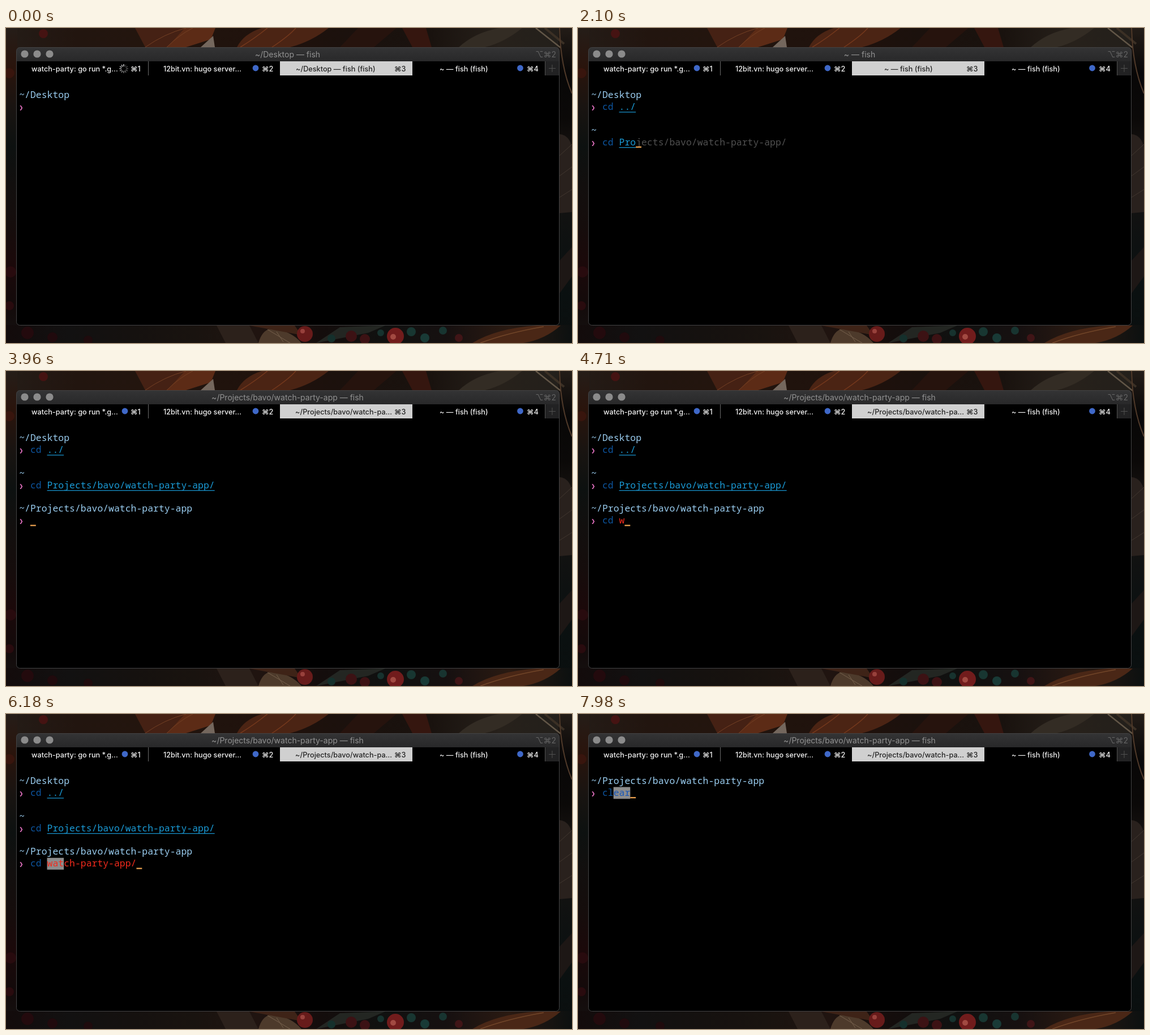
Animation of 1000 by 558 pixels, one loop 8000 ms. Source, as an HTML page with a canvas:

```html
<!DOCTYPE html>
<html lang="en">
<head>
<meta charset="utf-8">
<title>Terminal session</title>
<style>
  html, body { margin: 0; width: 100%; height: 100%; overflow: hidden; background: #14100e; }
  canvas { display: block; width: 100vw; height: 100vh; }
</style>
</head>
<body>
<canvas id="stage" width="1000" height="558"></canvas>
<script>
const ctx = document.getElementById('stage').getContext('2d');
const LOOP = 8000, CELL = 9.87, ROW = 20.9, LEFT = 23.2, BASE = 124;
const MONO = '16.45px "Noto Sans Mono", "DejaVu Sans Mono", monospace';
const SANS = 'Inter, "DejaVu Sans", sans-serif';
const C = { path: '#9acdf0', cmd: '#0d559f', arg: '#1a9bd7', hint: '#505050',
            bad: '#f22a1c', prompt: '#f57ad0', cursor: '#f2a552', hit: '#8c8c8c', dot: '#3f68c8' };
const PROJECT = 'Projects/bavo/watch-party-app';

// ---------- drawing helpers ----------
function rect(x, y, w, h, color) {
  ctx.fillStyle = color;
  ctx.fillRect(x, y, w, h);
}

function disc(x, y, r, color) {
  ctx.fillStyle = color;
  ctx.beginPath();
  ctx.arc(x, y, r, 0, 7);
  ctx.fill();
}

function label(text, x, y, font, color, align = 'left') {
  ctx.font = font + ' ' + SANS;
  ctx.fillStyle = color;
  ctx.textAlign = align;
  ctx.fillText(text, x, y);
}

function gradient(x0, y0, x1, y1, colors) {
  const g = ctx.createLinearGradient(x0, y0, x1, y1);
  colors.forEach((c, i) => g.addColorStop(i / (colors.length - 1), c));
  return g;
}

function shape(d, fill, stroke, width = 1) {
  const p = new Path2D(d);
  if (fill) { ctx.fillStyle = fill; ctx.fill(p); }
  if (stroke) { ctx.strokeStyle = stroke; ctx.lineWidth = width; ctx.stroke(p); }
}

// ---------- autumn backdrop ----------
function backdrop() {
  rect(0, 0, 1000, 558, '#120f0e');
  rect(0, 0, 1000, 36, gradient(0, 0, 1000, 0,
    ['#241c17', '#22150f', '#23150e', '#20130d', '#1f110c', '#1a110d', '#19120e', '#27211b', '#221f1b']));
  rect(0, 0, 20, 558, gradient(0, 0, 0, 558,
    ['#251d18', '#2a140c', '#191411', '#0d1110', '#120f0e', '#150d0c', '#1b090a', '#130a0a', '#151211']));
  rect(976, 0, 24, 558, gradient(0, 0, 0, 558,
    ['#231c17', '#080707', '#0b0908', '#1a1613', '#121211', '#0d1111', '#0a1010', '#0b0f0f']));
  rect(0, 526, 1000, 32, gradient(0, 0, 1000, 0,
    ['#130b0b', '#121111', '#15110f', '#19130f', '#201410', '#140d0c', '#101110', '#161010', '#2a1a12', '#0c1010']));

  disc(66, 10, 8, '#451312');
  shape('M228 0H316L284 34H246Z', '#452114');
  shape('M316 0H370L362 20L318 34H284Z', '#5c2b16');
  shape('M344 34L366 14L369 34Z', '#74675d');
  shape('M246 34Q280 10 318 0M284 34Q306 12 330 0', null, '#744024');
  shape('M408 34Q420 10 452 0H570Q540 24 502 34Z', '#4b2414');
  shape('M470 34Q500 14 512 0M414 34Q440 18 462 0', null, '#74381c', 1.5);
  shape('M590 34L622 0H690L650 34Z', '#26130d');
  shape('M700 0H742L752 34H718Z', '#35160f');
  shape('M800 34Q828 8 872 0H912Q880 26 846 34Z', '#332c24');
  shape('M936 0L980 35', null, '#625647', 2.5);
  shape('M952 0L986 28', null, '#3b3025', 4);
  shape('M978 0Q980 70 1000 116', null, '#503a2a', 2);
  shape('M978 188Q996 190 1000 212V326L978 328Z', '#29211d');
  shape('M978 226L1000 206M978 262L1000 246M978 300L1000 286', null, '#41362f');
  shape('M978 412L1000 388V440L978 470Z', '#1d1715');

  [[6, 80, 9, '#38150d'], [8, 432, 10, '#280b0e'], [6, 492, 8, '#290b0e'],
   [38, 540, 11, '#230a0d'], [82, 548, 9, '#200a0d'], [145, 553, 8, '#1f0b0d'],
   [404, 550, 8, '#281310']].forEach(d => disc(...d));
  shape('M372 527H430L446 558H388Z', '#2c211b');
  shape('M446 558Q452 536 468 532Q504 536 522 558Z', '#4d3a2b');
  shape('M462 534L502 558M478 538L490 556', null, '#75604b');
  shape('M430 527H510L522 544Z', '#3e2317');
  shape('M548 558L590 530L670 527L640 540Z', '#232622');
  [[528, 542, 14, '#671b1a'], [575, 550, 7, '#15302c'], [610, 546, 10, '#3c1214'],
   [634, 551, 9, '#3c1214'], [662, 540, 6, '#17322e'], [688, 546, 15, '#711c1c'],
   [716, 538, 8, '#183631'], [740, 549, 8, '#193a36'], [772, 536, 7, '#183430'],
   [800, 549, 7, '#401517']].forEach(d => disc(...d));
  disc(524, 537, 4, '#98413c');
  disc(684, 547, 5, '#a24a42');
  shape('M824 558Q866 532 938 527H980Q952 552 914 558Z', '#4a2716');
  shape('M838 558Q886 540 950 529', null, '#724629', 1.5);
}

// ---------- terminal window ----------
function spinner(x, y, t) {
  const lead = Math.floor(t / 80) % 12;
  for (let i = 0; i < 12; i++) {
    const a = i * Math.PI / 6 - Math.PI / 2;
    const fade = ((lead - i + 12) % 12) / 12;
    ctx.strokeStyle = `rgba(205,205,205,${0.9 - 0.7 * fade})`;
    ctx.lineWidth = 1.7;
    ctx.beginPath();
    ctx.moveTo(x + 4 * Math.cos(a), y + 4 * Math.sin(a));
    ctx.lineTo(x + 8 * Math.cos(a), y + 8 * Math.sin(a));
    ctx.stroke();
  }
}

function tab(x, text, textX, number, active) {
  const color = active ? '#242424' : '#f2f2f2';
  const font = '500 12.7px';
  if (active) rect(x, 59, 234, 25, '#d0d0d0');
  label(text, textX, 77, font, color);
  label('⌘' + number, x + 202, 77, font, color);
}

function chrome(t) {
  ctx.beginPath();
  ctx.roundRect(18.5, 34.5, 959, 492, 6);
  ctx.fillStyle = '#000';
  ctx.fill();
  ctx.save();
  ctx.clip();
  rect(18, 34, 960, 25, gradient(0, 34, 0, 59, ['#343435', '#282829']));
  ctx.restore();
  ctx.strokeStyle = '#434344';
  ctx.lineWidth = 1;
  ctx.stroke();
  [33, 55, 77].forEach(x => disc(x, 46, 6.6, '#8b8b8b'));

  const place = t < 900 ? 0 : t < 3300 ? 1 : 2;
  const title = ['~/Desktop — fish', '~ — fish', `~/${PROJECT} — fish`][place];
  label(title, 497.5, 51.5, '14px', '#929292', 'center');
  label('⌥⌘2', 972, 51.5, '14px', '#646464', 'right');

  tab(18, 'watch-party: go run *.g…', 45, 1);
  tab(250, '12bit.vn: hugo server…', 278, 2);
  tab(484, ['~/Desktop — fish (fish)', '~ — fish (fish)', '~/Projects/bavo/watch-pa…'][place],
      [512, 541, 511][place], 3, true);
  tab(718, '~ — fish (fish)', 766, 4);
  if (t < 500) spinner(208, 72, t);
  else disc(210, 71, 5.4, C.dot);
  disc(441, 71, 5.4, C.dot);
  disc(908.5, 71, 5.4, C.dot);
  rect(251, 59, 1, 25, '#686868');
  rect(952, 59, 25, 25, '#222223');
  rect(952, 59, 1, 25, '#505050');
  rect(959, 71, 12, 1, '#505050');
  rect(964.5, 65, 1, 13, '#505050');
}

// ---------- terminal text ----------
const baseline = row => BASE + ROW * row;
const column = col => LEFT + CELL * col;

function put(row, col, text, color, { line, back } = {}) {
  const x = column(col), y = baseline(row), w = CELL * text.length;
  if (back) rect(x, y - 15.5, w, ROW, back);
  ctx.font = MONO;
  ctx.textAlign = 'left';
  ctx.fillStyle = color;
  [...text].forEach((ch, i) => ctx.fillText(ch, x + i * CELL, y));
  if (line && text) rect(x, y + 3.5, w, 1.2, color);
}

function prompt(row, path) {
  put(row, 0, path, C.path);
  ctx.font = 'bold 12px "DejaVu Sans Mono", "DejaVu Sans", monospace';
  ctx.fillStyle = C.prompt;
  ctx.fillText('❯', LEFT, baseline(row + 1));
}

function cursor(row, col) {
  rect(column(col), baseline(row) + 2.2, CELL, 2.2, C.cursor);
}

function cd(row, text, argStyle = { line: true }, argColor = C.arg) {
  put(row, 2, text.slice(0, 2), text.length < 2 ? C.bad : C.cmd);
  put(row, 5, text.slice(3), argColor, argStyle);
}

function typed(text, t, start, step) {
  return text.slice(0, Math.max(0, Math.floor((t - start) / step) + 1));
}

function afterClear(t) {
  prompt(0, '~/' + PROJECT);
  if (t < 7850) {
    const text = typed('ear', t, 7450, 100);
    put(1, 2, text, C.bad);
    cursor(1, 2 + text.length);
  } else {
    put(1, 2, 'cl', C.cmd);
    put(1, 4, 'ear', '#1857b8', { back: C.hit });
    cursor(1, 7);
  }
}

function session(t) {
  if (t >= 7320) return afterClear(t);

  prompt(0, '~/Desktop');
  const up = typed('cd ../', t, 250, 100);
  cd(1, up);
  if (t < 900) {
    if (t >= 250) cursor(1, 2 + up.length);
    return;
  }

  prompt(3, '~');
  const full = `cd ${PROJECT}/`;
  const go = t < 2700 ? typed('cd Pro', t, 1300, 140) : full;
  if (go.length > 3) put(4, 2 + go.length, full.slice(go.length), C.hint);
  cd(4, go);
  if (t < 3300) return cursor(4, 2 + go.length);

  prompt(6, '~/' + PROJECT);
  const find = t < 5300 ? typed('cd wat', t, 4250, 130)
    : t < 5800 ? 'cd watch-party' : 'cd watch-party-app/';
  if (t >= 5300) rect(column(5), baseline(7) - 15.5, CELL * 3, ROW, C.hit);
  cd(7, find, {}, C.bad);
  if (t < 6300) return cursor(7, 2 + find.length);

  put(7, 21, '^C', '#101010', { back: '#d0d0d0' });
  prompt(8, '~/' + PROJECT);
  const word = typed('clear', t, 6600, 140);
  put(9, 2, word, word === 'clear' ? C.cmd : C.bad);
  if (word) put(9, 2 + word.length, 'clear'.slice(word.length), C.hint);
  cursor(9, 2 + word.length);
}

function frame() {
  const t = performance.now() % LOOP;
  backdrop();
  chrome(t);
  session(t);
  requestAnimationFrame(frame);
}
frame();
</script>
</body>
</html>
```
